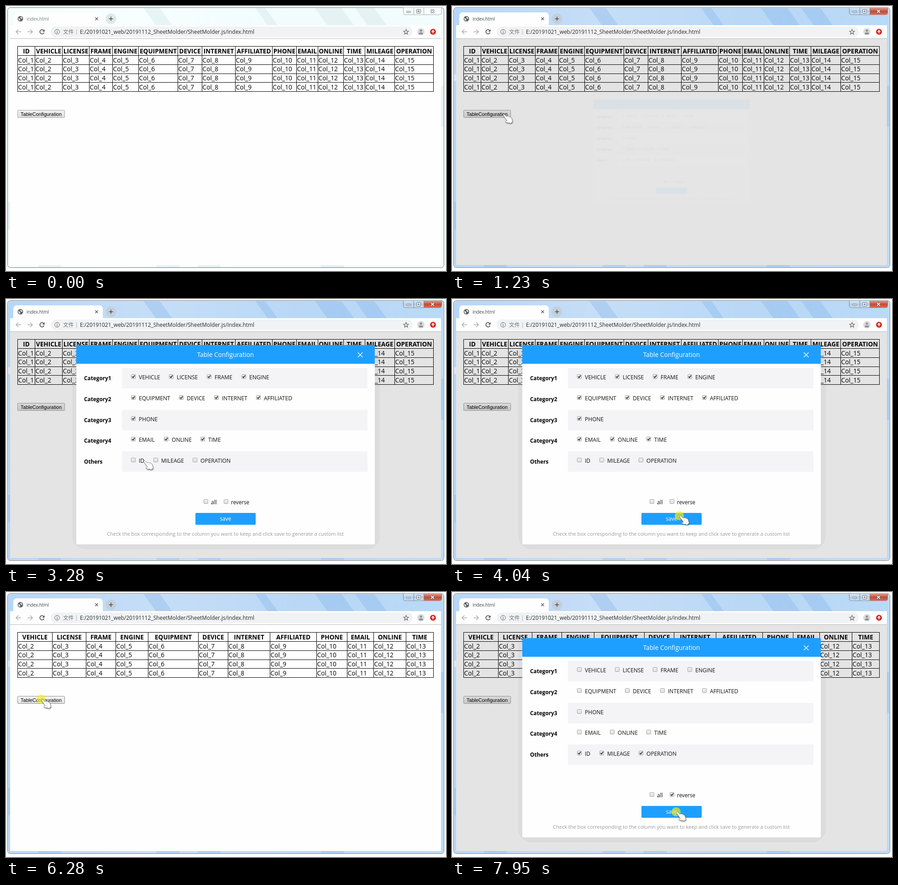
These frames come from a looping animation (964x581 px, 8000 ms). An HTML page with a canvas:

```html
<!DOCTYPE html>
<html lang="en">
<head>
<meta charset="utf-8">
<title>Table configuration</title>
<style>
  html, body { margin: 0; width: 100%; height: 100%; overflow: hidden; background: #fff; }
  canvas { display: block; }
</style>
</head>
<body>
<canvas id="stage" width="964" height="581"></canvas>
<script>
const g = document.getElementById('stage').getContext('2d');
const LOOP = 8000;
const SANS = '"Open Sans", "Noto Sans", sans-serif';
const BLUE = '#1e9fff';

const NAMES = ['ID', 'VEHICLE', 'LICENSE', 'FRAME', 'ENGINE', 'EQUIPMENT', 'DEVICE', 'INTERNET',
  'AFFILIATED', 'PHONE', 'EMAIL', 'ONLINE', 'TIME', 'MILEAGE', 'OPERATION'];
const FULL = { first: 0, edges: [25, 63, 123, 182, 233, 290, 376, 429, 502, 583, 636, 683, 739, 786, 851, 936] };
const CUSTOM = { first: 1, edges: [25, 101, 175, 240, 311, 421, 486, 578, 680, 747, 805, 876, 936] };
const ROW_LINES = [88, 108, 128, 148, 167, 187];

// Each option is [column, checkbox x]
const GROUPS = [
  ['Category1', [1, 274], [2, 357], [3, 440], [4, 516]],
  ['Category2', [5, 274], [6, 379], [7, 456], [8, 548]],
  ['Category3', [9, 274]],
  ['Category4', [10, 274], [11, 346], [12, 426]],
  ['Others', [0, 274], [13, 323], [14, 409]]
];

// Pointer stops: time, x, y
const PATH = [
  [0, 842, 590], [110, 842, 590], [910, 108, 241], [950, 108, 236], [1190, 108, 236],
  [1890, 449, 353], [2080, 449, 353], [2330, 364, 354], [2450, 364, 354], [2700, 303, 354],
  [2750, 301, 353], [2960, 300, 353], [3120, 301, 354], [3280, 301, 354], [3870, 498, 475],
  [4070, 498, 475], [4720, 79, 72], [4750, 78, 69], [4900, 78, 60], [5480, 78, 60],
  [6180, 77, 235], [6400, 77, 235], [7140, 532, 448], [7300, 508, 446], [7460, 508, 446],
  [7860, 491, 482], [8000, 491, 482]
];
const CLICKS = [[1090, 1180], [2000, 2080], [2370, 2450], [3120, 3250], [3940, 4050],
  [5000, 5090], [6280, 6390], [7360, 7450], [7950, 8000]];
const MODALS = [{ open: 1190, close: 4050 }, { open: 6390, close: 9000 }];
const UNCHECK = { 14: 2080, 13: 2450, 0: 3250 };
const ACTIVE_AT = 1090, SAVED_AT = 4050, REVERSED_AT = 7450;
const LOADING = [5090, 5350];

const within = (t, [a, b]) => t >= a && t < b;
const ease = k => k * k * (3 - 2 * k);
const clamp = k => Math.max(0, Math.min(1, k));

function pointer(t) {
  let i = 1;
  while (i < PATH.length - 1 && t >= PATH[i][0]) i++;
  const [t0, x0, y0] = PATH[i - 1], [t1, x1, y1] = PATH[i];
  const k = ease(clamp((t - t0) / (t1 - t0)));
  return [x0 + (x1 - x0) * k, y0 + (y1 - y0) * k];
}

function rect(x, y, w, h, fill) {
  g.fillStyle = fill;
  g.fillRect(x, y, w, h);
}

function round(x, y, w, h, r, fill, stroke) {
  g.beginPath();
  g.roundRect(x, y, w, h, r);
  if (fill) { g.fillStyle = fill; g.fill(); }
  if (stroke) { g.strokeStyle = stroke; g.stroke(); }
}

function disc(x, y, r, fill, stroke) {
  g.beginPath();
  g.arc(x, y, r, 0, Math.PI * 2);
  if (fill) { g.fillStyle = fill; g.fill(); }
  if (stroke) { g.strokeStyle = stroke; g.stroke(); }
}

// Polyline through a flat list of coordinates
function line(pts, color, width = 1) {
  g.beginPath();
  for (let i = 0; i < pts.length; i += 2) g.lineTo(pts[i], pts[i + 1]);
  g.strokeStyle = color;
  g.lineWidth = width;
  g.stroke();
  g.lineWidth = 1;
}

function cross(x, y, r, color, width) {
  line([x - r, y - r, x + r, y + r], color, width);
  line([x - r, y + r, x + r, y - r], color, width);
}

function text(s, x, y, size, color = '#000', weight = 400, align = 'left', family = SANS) {
  g.font = `${weight} ${size}px ${family}`;
  g.textAlign = align;
  g.fillStyle = color;
  g.fillText(s, x, y);
}

function vertical(y0, y1, ...colors) {
  const grad = g.createLinearGradient(0, y0, 0, y1);
  colors.forEach((c, i) => grad.addColorStop(i / (colors.length - 1), c));
  return grad;
}

function glass(active) {
  g.save();
  g.beginPath();
  g.roundRect(3.5, 3.5, 956, 570, 6);
  g.clip();
  const base = g.createLinearGradient(0, 0, 964, 0);
  const tones = active ? ['#b5d6f8', '#c6def7', '#b9d8f6', '#bad9f7'] : ['#f5fdfd', '#f6fefe', '#f2fcfc', '#f3fcfc'];
  tones.forEach((c, i) => base.addColorStop(i / 3, c));
  rect(0, 0, 964, 581, base);
  g.fillStyle = active ? 'rgba(115,170,228,.28)' : 'rgba(200,222,224,.32)';
  for (const [x, w] of [[300, 36], [545, 22], [676, 58], [764, 42]]) {
    g.beginPath();
    g.moveTo(x, 3);
    g.lineTo(x + w, 3);
    g.lineTo(x + w + 28, 42);
    g.lineTo(x + 28, 42);
    g.fill();
  }
  g.fillRect(3, 430, 6, 60);
  g.fillRect(953, 175, 7, 90);
  for (const x of [70, 330, 420, 690]) g.fillRect(x, 568, 50, 6);
  if (active) rect(3, 150, 6, 14, 'rgba(255,255,255,.45)');
  g.restore();
  round(3.5, 3.5, 956, 570, 6, null, '#6c7278');
  if (active) round(4.5, 4.5, 954, 568, 5, null, 'rgba(255,255,255,.55)');
}

function captionButtons(active) {
  const edge = active ? '#6f8ba8' : '#a4adb0';
  round(870.5, 3.5, 84, 15.5, [0, 0, 4, 4], active ? vertical(4, 19, '#dbeaf8', '#b4cde6', '#cfe2f5') : '#f7fdfd', edge);
  if (active) round(916, 4, 38, 15, [0, 0, 4, 0], vertical(4, 19, '#e3a293', '#c64a33', '#d2705a'));
  line([893.5, 4, 893.5, 19], edge);
  line([915.5, 4, 915.5, 19], edge);
  const ink = '#5b6268';
  round(877.5, 11.5, 9, 3, 1, '#fff', ink);
  round(899.5, 7.5, 9, 8, 1, '#fff', ink);
  g.strokeRect(902.5, 10.5, 3, 2);
  cross(934.5, 11.5, 3.4, ink, 3.6);
  cross(934.5, 11.5, 3.2, '#fff', 1.8);
}

function favicon(t, loading) {
  if (loading) {
    const a = t / 110;
    g.beginPath();
    g.arc(31.5, 28, 5.5, a, a + 4.3);
    g.strokeStyle = '#4285d8';
    g.lineWidth = 1.6;
    g.stroke();
    g.lineWidth = 1;
    return;
  }
  disc(31.5, 28, 6, '#5c6166');
  g.fillStyle = '#fff';
  g.beginPath();
  g.moveTo(27, 26);
  g.quadraticCurveTo(31, 28, 31, 30);
  g.lineTo(30.5, 32.5);
  g.quadraticCurveTo(27, 31, 27, 26);
  g.fill();
  g.beginPath();
  g.moveTo(31, 23.5);
  g.lineTo(34, 24.5);
  g.lineTo(36, 28);
  g.lineTo(33, 28);
  g.fill();
}

function toolbar(t, loading) {
  rect(9, 42, 944, 30, '#fefefe');
  rect(9, 71, 944, 1, '#b8b8b8');
  const dim = '#a7a9ab', ink = '#45494d';
  line([33, 56.5, 22, 56.5], dim, 1.4);
  line([27, 51.5, 22, 56.5, 27, 61.5], dim, 1.4);
  line([47, 56.5, 58, 56.5], dim, 1.4);
  line([53, 51.5, 58, 56.5, 53, 61.5], dim, 1.4);
  if (loading) {
    cross(79, 56.5, 4, ink, 1.6);
  } else {
    g.beginPath();
    g.arc(79, 56.5, 4.7, 0.35, 5.4);
    g.strokeStyle = ink;
    g.lineWidth = 1.6;
    g.stroke();
    g.lineWidth = 1;
    g.fillStyle = ink;
    g.beginPath();
    g.moveTo(84.5, 51);
    g.lineTo(84.5, 56);
    g.lineTo(79.5, 56);
    g.fill();
  }
  round(98, 45, 793, 23, 11.5, '#f0f2f3');
  disc(112, 56.5, 5.2, null, '#5f6368');
  rect(111.4, 56, 1.3, 3.6, '#5f6368');
  rect(111.4, 53.4, 1.3, 1.4, '#5f6368');
  text('文件', 125, 61, 11.7, '#6b6f73', 400, 'left', '"Noto Sans CJK SC", "Noto Sans CJK", sans-serif');
  rect(154, 51, 1, 12, '#b4b7ba');
  text('E:/20191021_web/20191112_SheetMolder/SheetMolder.js/index.html', 162, 60.5, 11.87, '#26292c');
  g.beginPath();
  for (let i = 0; i < 10; i++) {
    const r = i % 2 ? 2.5 : 5.8, a = i * Math.PI / 5 - Math.PI / 2;
    g.lineTo(876.5 + r * Math.cos(a), 57 + r * Math.sin(a));
  }
  g.closePath();
  g.strokeStyle = '#565a5e';
  g.lineWidth = 1.1;
  g.stroke();
  g.lineWidth = 1;
  disc(909, 56.5, 8, '#d9dadb');
  disc(909, 54, 2.5, '#8d9194');
  round(904.5, 58, 9, 4, [4, 4, 1, 1], '#8d9194');
  disc(935.5, 56.5, 6.5, '#d8291f');
  line([935.5, 60, 935.5, 54], '#fff', 1.8);
  line([932.5, 56.5, 935.5, 53.5, 938.5, 56.5], '#fff', 1.6);
}

function browser(t, active) {
  const loading = within(t, LOADING);
  glass(active);
  captionButtons(active);
  round(16, 14, 196, 30, [7, 7, 0, 0], '#fefefe');
  favicon(t, loading);
  text('index.html', 45, 32, 9.9, active ? '#3f4347' : '#777b7e');
  cross(198.5, 28, 3, '#4f5357', 1.3);
  disc(230, 28, 11.5, active ? '#c3cfdb' : '#e0e7e8');
  line([225.5, 28, 234.5, 28], '#45494d', 1.5);
  line([230, 23.5, 230, 32.5], '#45494d', 1.5);
  toolbar(t, loading);
  rect(9, 72, 944, 496, '#fefefe');
}

function table({ first, edges }) {
  const last = edges.length - 1;
  for (const y of ROW_LINES) rect(25, y, 912, 1, '#000');
  for (const x of edges) rect(x, 88, 1, 100, '#000');
  for (let i = 0; i < last; i++) {
    const col = first + i;
    text(NAMES[col], (edges[i] + edges[i + 1] + 1) / 2, 104, 13.6, '#000', 700, 'center');
    for (let r = 0; r < 4; r++) text('Col_' + (col + 1), edges[i] + 1.5, 123.5 + r * 19.7, 13.8);
  }
}

function pageButton(hover) {
  round(25.5, 228.5, 103, 16, 1, hover ? vertical(228, 245, '#f8f8f8', '#e0e0e0') : vertical(228, 245, '#f3f3f3', '#dcdcdc'),
    hover ? '#8c8c8c' : '#a3a3a3');
  text('TableConfiguration', 32, 240.7, 10.8, '#000', 400, 'left', '"Liberation Sans", Arial, sans-serif');
}

function checkbox(x, y, on) {
  round(x + .5, y + .5, 9, 9, 1, vertical(y, y + 10, '#f2f2f2', '#dedede'), '#a2a2a2');
  if (on) line([x + 2.4, y + 4.8, x + 4.4, y + 7.2, x + 8.2, y + 2.2], '#34373a', 1.8);
}

function checked(col, t) {
  const on = !(col in UNCHECK) || t < UNCHECK[col];
  return on !== t >= REVERSED_AT;
}

function modalBody(t) {
  round(145, 93, 674, 456, 30, 'rgba(0,0,0,.035)');
  round(154, 101, 654, 437, 2, '#fefefe');
  round(154, 101, 654, 41, [2, 2, 0, 0], BLUE);
  text('Table Configuration', 481, 127, 13.7, '#fff', 400, 'center');
  cross(776, 122.5, 5.3, '#fff', 1.3);
  GROUPS.forEach(([title, ...options], i) => {
    const y = Math.round(i * 45.8);
    if (i % 2 === 0) rect(254, 151 + y, 538, 45, '#f4f4f7');
    text(title, 171, 177.5 + y, 11.8, '#000', 700);
    for (const [col, x] of options) {
      checkbox(x, 165 + y, checked(col, t));
      text(NAMES[col], x + 17, 176 + y, 12.05, '#111');
    }
  });
  checkbox(433, 439, false);
  text('all', 449, 450, 12, '#111');
  checkbox(477, 439, t >= REVERSED_AT);
  text('reverse', 493, 450, 11.7, '#111');
  round(415, 469, 132, 26, 2, BLUE);
  text('save', 481, 486, 11.7, '#fff', 400, 'center');
  text('Check the box corresponding to the column you want to keep and click save to generate a custom list',
    221, 519, 11.05, '#999');
}

function modal(t, { open, close }) {
  if (t < open || t > close + 200) return;
  const shown = clamp((t - open) / 300), gone = clamp((t - close) / 200);
  if (!gone) rect(9, 72, 944, 496, 'rgba(0,0,0,.1)');
  const scale = gone ? 1 - .3 * gone : .5 + .5 * ease(shown);
  g.save();
  g.beginPath();
  g.rect(9, 72, 944, 496);
  g.clip();
  g.globalAlpha = gone ? 1 - gone : ease(shown);
  g.translate(481, 320);
  g.scale(scale, scale);
  g.translate(-481, -320);
  modalBody(t);
  g.restore();
}

function hand(x, y) {
  g.save();
  g.translate(x, y);
  g.shadowColor = 'rgba(0,0,0,.6)';
  g.shadowBlur = 2.5;
  g.shadowOffsetX = .8;
  g.shadowOffsetY = 1.6;
  g.beginPath();
  g.moveTo(.4, 2.6);
  g.quadraticCurveTo(.2, -.4, 3, .8);
  g.lineTo(8.2, 5.6);
  g.quadraticCurveTo(10, 3.4, 12, 5.2);
  g.quadraticCurveTo(14, 4.2, 15.5, 6.6);
  g.quadraticCurveTo(18, 6, 18.6, 9);
  g.quadraticCurveTo(20.2, 12, 20, 14.2);
  g.lineTo(21.4, 15.8);
  g.lineTo(16.4, 20.6);
  g.lineTo(14.4, 19);
  g.quadraticCurveTo(8, 19.4, 5.2, 17);
  g.quadraticCurveTo(4.6, 14.6, 8.8, 14.6);
  g.closePath();
  g.fillStyle = '#fff';
  g.fill();
  g.shadowColor = 'transparent';
  g.strokeStyle = '#8a8a8a';
  g.lineWidth = .9;
  g.stroke();
  line([10, 8, 12, 10], '#b5b5b5', .8);
  line([13.2, 7.8, 15, 9.8], '#b5b5b5', .8);
  g.restore();
}

function draw(t) {
  const [x, y] = pointer(t);
  const blocked = MODALS.some(m => within(t, [m.open, m.close]));
  rect(0, 0, 964, 581, '#fff');
  browser(t, t >= ACTIVE_AT);
  table(t < SAVED_AT ? FULL : CUSTOM);
  pageButton(!blocked && x >= 25 && x <= 129 && y >= 228 && y <= 240);
  MODALS.forEach(m => modal(t, m));
  if (CLICKS.some(c => within(t, c))) disc(x, y, 10, 'rgba(245,238,20,.66)');
  hand(x + .5, y);
}

const start = performance.now();
function tick() {
  draw((performance.now() - start) % LOOP);
  requestAnimationFrame(tick);
}
tick();
</script>
</body>
</html>
```
